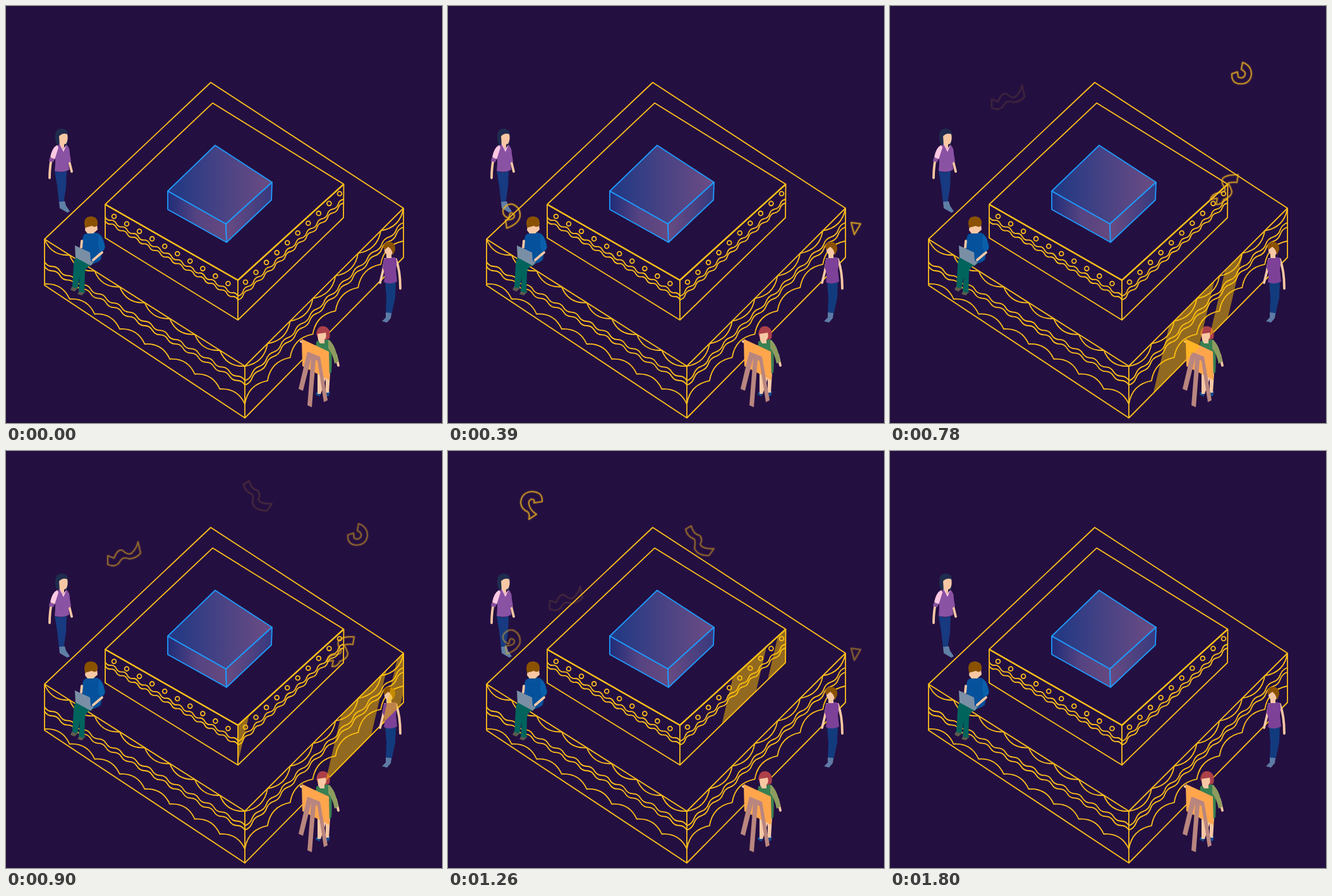
Write an HTML page that moves like this. It is 690 px wide and 660 px high and loops after 1830 ms.

```html
<!DOCTYPE html>
<html>
<head>
<meta charset="utf-8">
<style>
  html, body { margin: 0; width: 100%; height: 100%; overflow: hidden; background: #240f41; }
  svg { display: block; }
  .line { fill: none; stroke: #fdbf1c; stroke-width: 1.8; stroke-linejoin: round; }
  .cube { stroke: #1e9bff; stroke-width: 1.8; stroke-linejoin: round; }
  .skin { fill: #f8c8a4; }
  .arm { fill: none; stroke: #f8c8a4; stroke-width: 3.8; stroke-linecap: round; stroke-linejoin: round; }
  #confetti path { filter: drop-shadow(0 0 1.2px #c8921c); }
</style>
</head>
<body>
<svg width="690" height="660" viewBox="0 0 690 660">
  <defs>
    <linearGradient id="lid"><stop offset=".1" stop-color="#263a84"/><stop offset=".55" stop-color="#4b4384"/><stop offset="1" stop-color="#6c4c83"/></linearGradient>
    <linearGradient id="side"><stop offset="0" stop-color="#202d78"/><stop offset=".5" stop-color="#554382"/><stop offset="1" stop-color="#66497f"/></linearGradient>
    <linearGradient id="end"><stop offset="0" stop-color="#694b82"/><stop offset="1" stop-color="#37397f"/></linearGradient>
    <clipPath id="lowFace"><path d="M378 570L629 320V398L378 652Z"/></clipPath>
    <clipPath id="highFace"><path d="M367 434L535 282L534 335L367 497Z"/></clipPath>
  </defs>

  <g class="line">
    <path d="M324 121L629 320L378 570L61 369ZM61 369V442L378 652L629 398V320M378 570V652"/>
    <path d="M327 153.6L534.5 282L367 434L157 314ZM157 314V367L367 497L534 335L534.5 282M367 434V497"/>
    <path d="M157 314L367 434L534.5 282" stroke-width="2.4"/>
    <path id="trim"/>
    <g id="dots"></g>
  </g>

  <g class="cube">
    <path fill="url(#lid)" d="M331 220.5L421 279L348 345L256 293Z"/>
    <path fill="url(#side)" d="M256 293L348 345L349 374L256 322Z"/>
    <path fill="url(#end)" d="M348 345L421 279L420 307L349 374Z"/>
  </g>

  <!-- woman standing, left -->
  <g>
    <path fill="#1f2c4d" d="M78 204Q79 193 89 194Q99 195 98 206L97 219L85 222Q77 219 78 204Z"/>
    <path class="skin" d="M84 206Q90 200 97 203Q99 212 95 218L92 219V226L85 221Z"/>
    <path class="arm" d="M72 242Q69 256 69 272M100 246L104 262"/>
    <path fill="#8a52a3" d="M79 223L85 219L91 227L96 220Q101 224 101 234L103 246L99 248L100 259Q90 265 77 261Q79 244 77 234Z"/>
    <path fill="#ffc8e2" d="M81 220Q73 224 70 239L77 243L83 224ZM84 217L91 226L96 219L91 231Z"/>
    <path fill="#87509f" d="M69 240L77 242L75 247L68 246Z"/>
    <path fill="#173a80" d="M77 261Q87 265 96 261L95 287L91 313L84 312L81 285Z"/>
    <path fill="#5f7fa6" d="M84 310L93 309L95 316L101 325L97 327L85 320Z"/>
  </g>

  <g id="confetti" fill="none" stroke="#fdbf1c" stroke-width="2" stroke-linejoin="round"></g>

  <!-- man with laptop -->
  <g>
    <path fill="#5d5b4d" d="M105 443L114 447L108 452L102 449ZM117 449L126 452L120 458L113 456Z"/>
    <path fill="#00645d" d="M111 397L132 400L145 403L134 411Q126 412 125 422L124 454L115 452L117 428L113 447L105 445L107 412Q107 402 111 397Z"/>
    <path fill="#06519c" d="M123 362Q132 357 144 359Q154 362 157 382L152 390L150 402Q139 411 128 405Q120 387 120 372Z"/>
    <path class="skin" d="M126 347L144 346L145 354L138 360L129 360L125 355Z"/>
    <path fill="#8a5200" d="M124 344Q124 333 135 333Q146 334 145 346Q142 352 136 348Q129 350 125 351Z"/>
    <path class="arm" d="M120 372L119 382M152 390L138 402"/>
    <path fill="#0a5fa9" d="M147 362Q155 367 156 385L149 390Q144 377 147 362Z"/>
    <path fill="#7a8fa5" d="M109 379L133 390L134 403L139 405L134 411L110 398Z"/>
  </g>

  <!-- woman standing, right -->
  <g>
    <path class="arm" d="M600 401Q597 420 592 438M617 401Q624 418 624 447"/>
    <path fill="#123b7e" d="M600 436Q609 440 617 436L616 462L610 489L601 488L602 462Z"/>
    <path fill="#5d7ba5" d="M601 485L610 486L609 494L603 501L595 499L601 493Z"/>
    <path fill="#7d4198" d="M598 401Q606 396 616 398Q620 402 617 418L619 436Q609 442 598 437Q601 424 596 414Z"/>
    <path class="skin" d="M599 382L612 380Q614 390 610 394V399L602 399V393Q598 390 599 382Z"/>
    <path fill="#8a5200" d="M597 382Q598 373 607 373Q617 375 616 386L612 395Q612 386 605 381L599 386Z"/>
  </g>

  <!-- painter at easel -->
  <g>
    <path fill="#174c91" d="M491 611L499 613L496 618L490 615ZM506 609L513 610L511 617L504 619Z"/>
    <path class="skin" d="M493 580H513L511 612H506V590L498 614H493Z"/>
    <path class="arm" d="M522 552L526 569M481 537L467 531"/>
    <path fill="#398052" d="M491 531Q502 525 513 529Q517 550 515 580Q505 587 495 582L490 550Z"/>
    <path fill="#8d9c5e" d="M510 528Q521 534 526 563L520 566Q517 550 510 542Z"/>
    <path fill="#ad4049" d="M491 519Q493 505 504 507Q515 510 512 526Q505 530 495 529Z"/>
    <path class="skin" d="M493 519L506 517Q508 525 504 528V534L497 534L494 529Z"/>
    <path fill="#ffa64d" d="M468 527L511 547L512 592L469 570Z"/>
    <path fill="#b9867f" d="M477 547L497 555L509 624L503 627L493 562L490 560L484 635L477 632L483 557L470 609L463 606Z"/>
  </g>

  <g fill="#ffc300" fill-opacity=".5">
    <g clip-path="url(#lowFace)"><path id="lowShine"/></g>
    <g clip-path="url(#highFace)"><path id="highShine"/></g>
  </g>
</svg>
<script>
const $ = id => document.getElementById(id);
const NS = 'http://www.w3.org/2000/svg';

function add(parent, tag, attrs) {
  const el = document.createElementNS(NS, tag);
  for (const key in attrs) el.setAttribute(key, attrs[key]);
  return parent.appendChild(el);
}

// n bows from a to b, square to the line; sign(i) turns each down (+) or up (-)
function bows([x1, y1], [x2, y2], n, depth, sign) {
  const dx = x2 - x1, dy = y2 - y1, push = 2 * depth / Math.hypot(dx, dy);
  const at = k => [x1 + dx * k / n, y1 + dy * k / n];
  let d = `M${x1} ${y1}`;
  for (let i = 0; i < n; i++) {
    const [cx, cy] = at(i + .5), out = push * sign(i);
    d += `Q${cx - dy * out} ${cy + dx * out} ${at(i + 1)}`;
  }
  return d;
}
const hang = () => 1, rise = () => -1, wave = i => i % 2 ? -1 : 1;

$('trim').setAttribute('d', [
  bows([61, 369], [378, 570], 8, 8.5, hang),
  bows([378, 570], [629, 320], 7, 9, hang),
  bows([61, 440], [378, 630], 8, 8, rise),
  bows([378, 630], [629, 372], 7, 9, rise),
  ...[0, 7].flatMap(y => [
    bows([61, 405 + y], [378, 593 + y], 26, 2, wave),
    bows([378, 593 + y], [629, 343 + y], 22, 2, wave)]),
  ...[0, 6].flatMap(y => [
    bows([157, 334 + y], [367, 459 + y], 24, 1.7, wave),
    bows([367, 459 + y], [534, 306 + y], 20, 1.7, wave)])
].join(''));

for (let i = 0; i < 10; i++) {
  add($('dots'), 'circle', { cx: 171 + 20.05 * i, cy: 333 + 11.8 * i, r: 3.4 });
  add($('dots'), 'circle', { cx: 379 + 16.55 * i, cy: 437 - 15.55 * i, r: 3.4 });
}

const spiral = 'M-7 19L-9 6Q6 6 5 -2Q2 -7 -2 -4L-4 3Q-14 0 -13 -10Q-8 -20 2 -19Q15 -14 14 0Q12 12 -7 19Z';
const wedge = 'M-7 -8L8 -6L-2 11Z';
// x, first y, start time, shape
const confetti = [
  [100, 282, 42, spiral], [100, 282, 1055, spiral],
  [645, 300, 42, wedge], [645, 300, 1055, wedge],
  [556, 54, 425, 'M-15 1L-6 -2L-5 6Q-1 9 4 6Q10 -1 0 -6L2 -17Q16 -12 16 2Q14 17 -2 17Q-16 16 -15 1Z'],
  [530, 250, 478, 'M21 -23Q4 -24 -3 -18Q-7 -12 0 -2Q2 4 -8 5Q-20 6 -23 16L-12 14L-14 24Q-4 24 -2 16Q10 12 11 4Q10 -2 5 -10Q12 -12 19 -11Z'],
  [187, 140, 677, 'M-26 2L-16 6Q-10 -10 -2 -6Q6 2 12 -2Q20 -10 22 -20L26 -2Q20 6 8 7Q-2 3 -6 10Q-12 22 -26 16Z'],
  [398, 64, 787, 'M-22 -18L-13 -23Q-10 -10 0 -8Q6 -2 1 6Q4 14 23 13L15 24Q-4 24 -8 12Q-6 4 -8 -2Q-20 -6 -22 -18Z'],
  [132, 30, 888, 'M-4 22L8 14Q-2 8 -4 -2Q-5 -8 0 -10Q6 -10 4 -4L17 -6Q18 -22 0 -22Q-16 -20 -17 -4Q-16 6 -6 10Q-2 14 -4 22Z']
].map(([x, y, start, d]) => ({ x, y, start, el: add($('confetti'), 'path', { d }) }));

const LOOP = 1830, STEP = 30, FALL = 690;

// leaning band between two x positions given at height y
function band(left, right, y) {
  const at = (x, h) => `${x + .235 * (y - h)} ${h}`;
  return `M${at(left, 250)}L${at(right, 250)}L${at(right, 660)}L${at(left, 660)}Z`;
}
const shine = (x, y, wide, gap) => band(x, x + 22, y) + band(x - gap - wide, x - gap, y);

function draw(now) {
  const t = Math.floor(now % LOOP / STEP) * STEP;
  for (const { x, y, start, el } of confetti) {
    const u = Math.min(1, Math.max(0, (t - start) / FALL));
    const p = (1 - Math.cos(Math.PI * u)) / 2;
    el.setAttribute('transform', `translate(${x} ${y + 100 * p})`);
    el.setAttribute('opacity', .72 * Math.sin(Math.PI * p));
  }
  $('lowShine').setAttribute('d', shine(419 + (t - 630) * .567, 530, 55, 13));
  $('highShine').setAttribute('d', shine(359 + (t - 900) * .361, 434, 42, 14));
  requestAnimationFrame(() => draw(performance.now() - origin));
}
const origin = performance.now();
draw(0);
</script>
</body>
</html>
```
